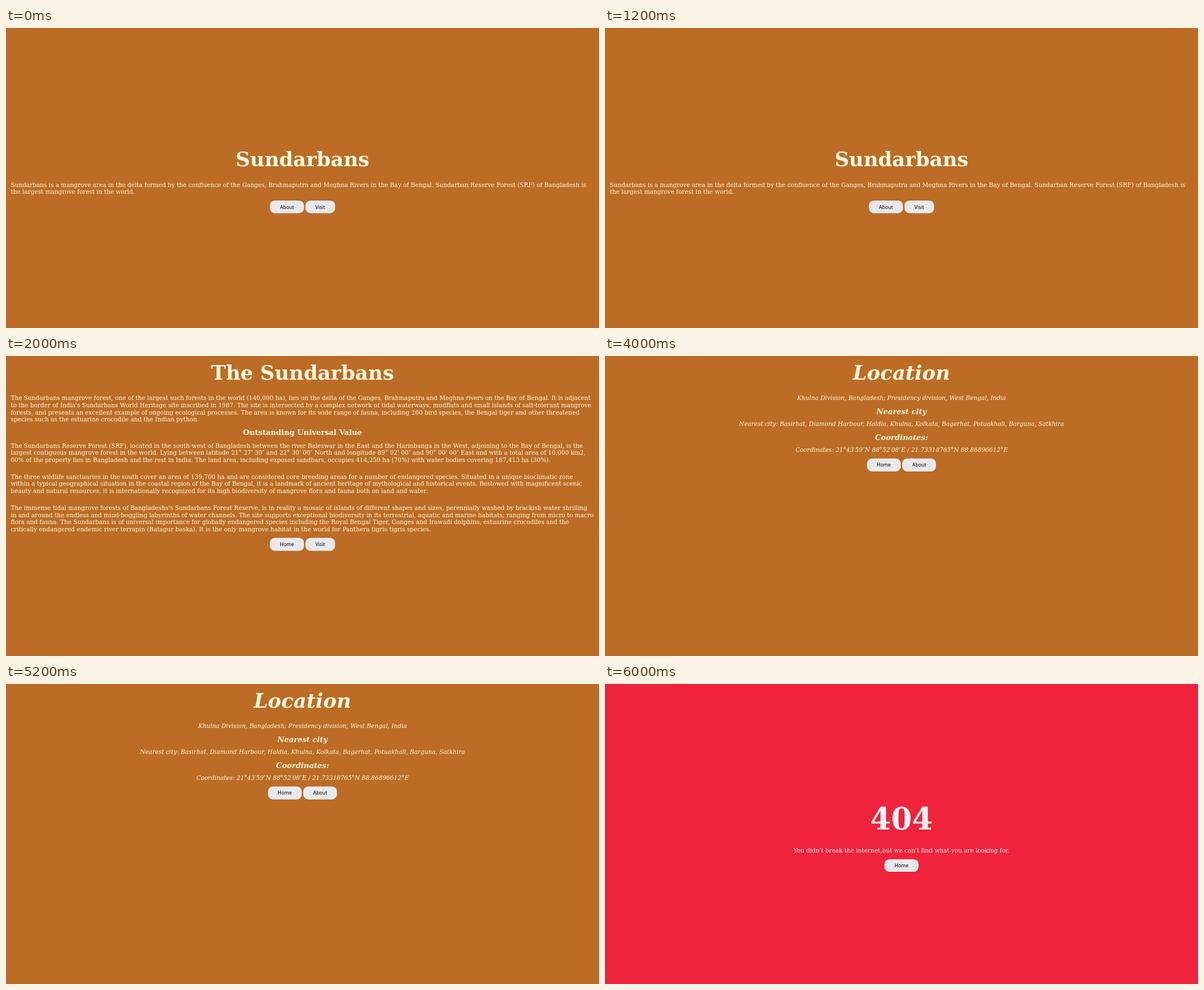
An HTML page that plays this animation: 1053 px wide and 532 px high, repeating every 8000 ms.

```html
<!DOCTYPE html>
<html lang="en">
<head>
<meta charset="utf-8">
<title>Sundarbans</title>
<style>
  html, body { margin: 0; width: 100%; height: 100%; overflow: hidden; background: #bc6c25; }
  /* Pages are laid out 1600px wide and scaled down to the stage. */
  section {
    position: absolute; left: 0; top: 0; width: 1600px; height: 809px;
    box-sizing: border-box; padding: 12.8px;
    transform: scale(.658125); transform-origin: 0 0;
    background: #bc6c25; color: #fefae0; white-space: nowrap;
    font: 16px/1.2 "DejaVu Serif", "Noto Serif", serif;
  }
  section[hidden] { display: none; }
  h1, h2, p { margin: 13.33px 0; }
  h1, h2, nav, .center { text-align: center; }
  h1 { margin: 0 0 26.67px; font-size: 54px; }
  h2 { font-size: 20px; }
  .apart { margin-top: 26.67px; }
  .home { padding-top: 321.6px; }
  .place { font-style: italic; }
  .lost { padding-top: 315.2px; background: #ef233c; color: #edf2f4; }
  .lost h1 { font-size: 81px; }
  nav { display: flex; justify-content: center; gap: 4.5px; }
  nav span {
    height: 34.7px; padding: 0 26.67px; border-radius: 13.33px;
    background: #e9e9ed; color: #000;
    font: normal 13.333px/34.7px "Noto Sans", "Open Sans", sans-serif;
  }
</style>
</head>
<body>
<section class="home">
  <h1>Sundarbans</h1>
  <p>Sundarbans is a mangrove area in the delta formed by the confluence of the Ganges, Brahmaputra and Meghna Rivers in the Bay of Bengal. Sundarban Reserve Forest (SRF) of Bangladesh is<br>
  the largest mangrove forest in the world.</p>
  <nav><span>About</span><span>Visit</span></nav>
</section>

<section hidden>
  <h1>The Sundarbans</h1>
  <p>The Sundarbans mangrove forest, one of the largest such forests in the world (140,000 ha), lies on the delta of the Ganges, Brahmaputra and Meghna rivers on the Bay of Bengal. It is adjacent<br>
  to the border of India's Sundarbans World Heritage site inscribed in 1987. The site is intersected by a complex network of tidal waterways, mudflats and small islands of salt-tolerant mangrove<br>
  forests, and presents an excellent example of ongoing ecological processes. The area is known for its wide range of fauna, including 260 bird species, the Bengal tiger and other threatened<br>
  species such as the estuarine crocodile and the Indian python.</p>
  <h2>Outstanding Universal Value</h2>
  <p>The Sundarbans Reserve Forest (SRF), located in the south-west of Bangladesh between the river Baleswar in the East and the Harinbanga in the West, adjoining to the Bay of Bengal, is the<br>
  largest contiguous mangrove forest in the world. Lying between latitude 21° 27' 30″ and 22° 30' 00″ North and longitude 89° 02' 00″ and 90° 00' 00″ East and with a total area of 10,000 km2,<br>
  60% of the property lies in Bangladesh and the rest in India. The land area, including exposed sandbars, occupies 414,259 ha (70%) with water bodies covering 187,413 ha (30%).</p>
  <p class="apart">The three wildlife sanctuaries in the south cover an area of 139,700 ha and are considered core breeding areas for a number of endangered species. Situated in a unique bioclimatic zone<br>
  within a typical geographical situation in the coastal region of the Bay of Bengal, it is a landmark of ancient heritage of mythological and historical events. Bestowed with magnificent scenic<br>
  beauty and natural resources, it is internationally recognized for its high biodiversity of mangrove flora and fauna both on land and water.</p>
  <p class="apart">The immense tidal mangrove forests of Bangladeshs's Sundarbans Forest Reserve, is in reality a mosaic of islands of different shapes and sizes, perennially washed by brackish water shrilling<br>
  in and around the endless and mind-boggling labyrinths of water channels. The site supports exceptional biodiversity in its terrestrial, aquatic and marine habitats; ranging from micro to macro<br>
  flora and fauna. The Sundarbans is of universal importance for globally endangered species including the Royal Bengal Tiger, Ganges and Irawadi dolphins, estuarine crocodiles and the<br>
  critically endangered endemic river terrapin (Batagur baska). It is the only mangrove habitat in the world for Panthera tigris tigris species.</p>
  <nav><span>Home</span><span>Visit</span></nav>
</section>

<section class="place" hidden>
  <h1>Location</h1>
  <p class="center">Khulna Division, Bangladesh; Presidency division, West Bengal, India</p>
  <h2>Nearest city</h2>
  <p class="center">Nearest city: Basirhat, Diamond Harbour, Haldia, Khulna, Kolkata, Bagerhat, Potuakhali, Barguna, Satkhira</p>
  <h2>Coordinates:</h2>
  <p class="center">Coordinates: 21°43′59″N 88°52′08″E / 21.73318765°N 88.86896612°E</p>
  <nav><span>Home</span><span>About</span></nav>
</section>

<section class="lost" hidden>
  <h1>404</h1>
  <p class="center">You didn't break the internet,but we can't find what you are looking for.</p>
  <nav><span>Home</span></nav>
</section>

<script>
  const pages = [...document.querySelectorAll("section")];
  const stay = 2000;
  const start = performance.now();

  function draw() {
    const elapsed = performance.now() - start;
    const current = Math.floor(elapsed / stay) % pages.length;
    pages.forEach((page, i) => { page.hidden = i !== current; });
    requestAnimationFrame(draw);
  }
  draw();
</script>
</body>
</html>
```
